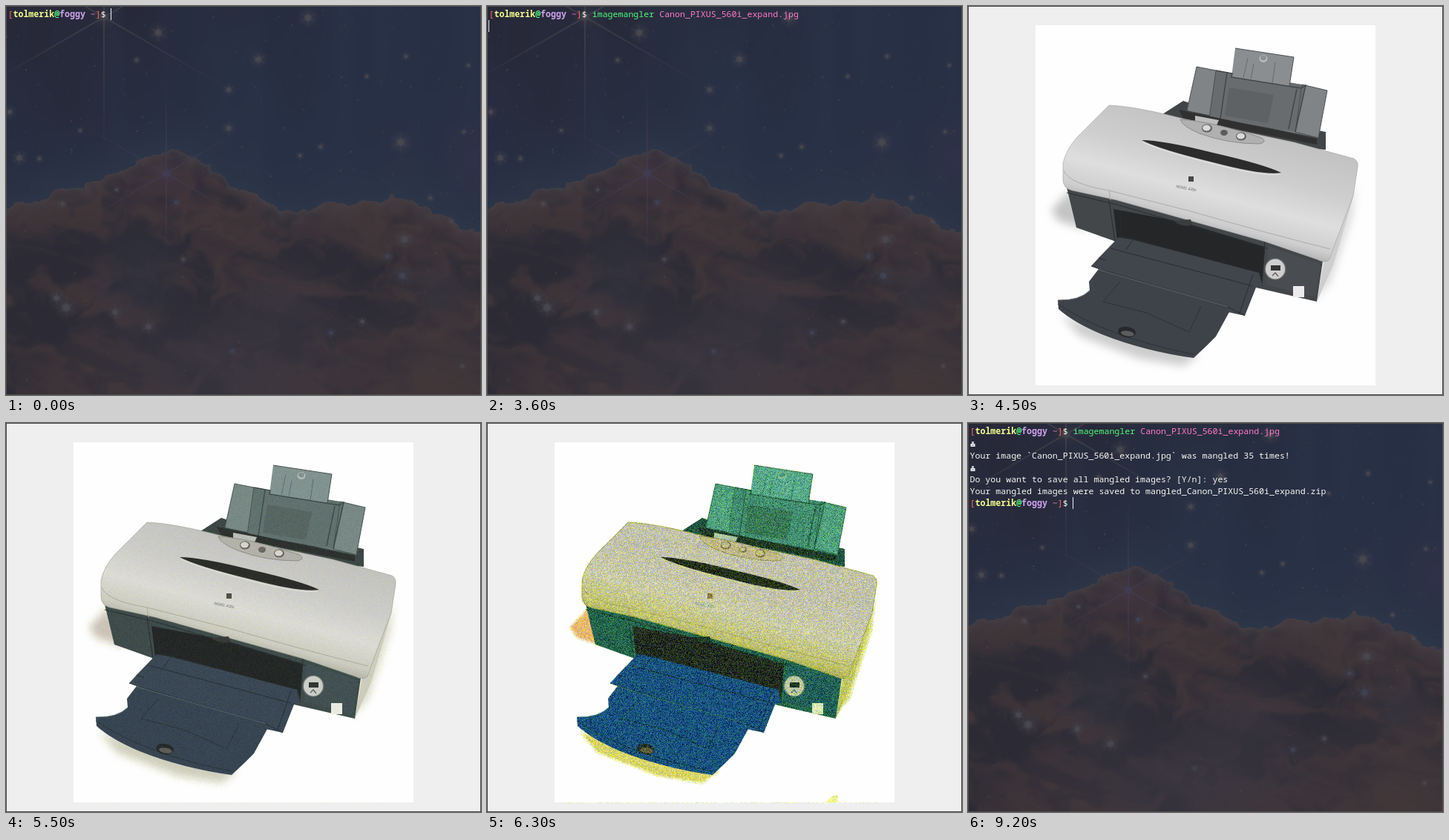
An HTML page with a canvas that plays this animation: 640 by 525 pixels, repeating every 10 s.

```html
<!DOCTYPE html>
<html lang="en">
<head>
<meta charset="utf-8">
<title>imagemangler in a terminal</title>
<style>
html, body { margin: 0; width: 100%; height: 100%; overflow: hidden; background: #282a36; }
#stage { position: relative; width: 640px; height: 525px; overflow: hidden; }
canvas { position: absolute; left: 0; top: 0; }
#frame { position: absolute; inset: 0; border: 1px solid #4b4b49; border-top-width: 1.5px; box-sizing: border-box; }
#term {
  position: absolute; left: 2.5px; top: 3.2px; margin: 0; color: #f8f8f2;
  font: 11.6px/16.2px "Noto Sans Mono", monospace; white-space: pre; font-variant-ligatures: none;
}
#term div { height: 16.2px; }
#term b { font-weight: 700; }
.red { color: #ff6a5c; }
.yellow { color: #f1fa8c; }
.green { color: #50fa7b; }
.violet { color: #cfa2ee; }
.pink { color: #ff79c6; }
.cursor { position: absolute; width: 1.4px; height: 16px; margin-left: -1px; background: #e4f2f4; }
.icon { display: block; padding-top: 5px; }
#more { position: absolute; left: 224px; top: 5px; font: 12px/16px "Noto Sans", sans-serif; color: #555; }
</style>
</head>
<body>
<div id="stage">
  <canvas id="view" width="640" height="525"></canvas>
  <div id="term"></div>
  <span id="more">»</span>
  <div id="frame"></div>
</div>
<script>
const W = 640, H = 525, LOOP = 10000;
const view = document.getElementById('view').getContext('2d', { willReadFrequently: true });
const term = document.getElementById('term');
const more = document.getElementById('more');

const clamp = v => Math.max(0, Math.min(1, v));
const rgb = c => typeof c === 'number' ? [c, c, c] : c;
const mix = (a, b, k) => { a = rgb(a); b = rgb(b); return a.map((v, i) => v + (b[i] - v) * k); };
const css = (c, a = 1) => `rgba(${rgb(c).map(Math.round)},${a})`;
const layer = () => Object.assign(document.createElement('canvas'), { width: W, height: H });

function random(seed) {
  return () => {
    seed = seed + 0x6D2B79F5 | 0;
    let h = Math.imul(seed ^ seed >>> 15, 1 | seed);
    h ^= h + Math.imul(h ^ h >>> 7, 61 | h);
    return ((h ^ h >>> 14) >>> 0) / 2 ** 32;
  };
}

// ---- wallpaper ----
function hash(x, y) {
  let h = Math.imul(x, 374761393) ^ Math.imul(y, 668265263);
  h = Math.imul(h ^ h >>> 13, 1274126177);
  return ((h ^ h >>> 16) >>> 0) / 2 ** 32;
}
function noise(x, y) {
  const i = Math.floor(x), j = Math.floor(y);
  let u = x - i, v = y - j;
  u *= u * (3 - 2 * u);
  v *= v * (3 - 2 * v);
  const a = hash(i, j), b = hash(i + 1, j), c = hash(i, j + 1), d = hash(i + 1, j + 1);
  return a + (b - a) * u + (c - a + (a - b - c + d) * u) * v;
}
function fbm(x, y, octaves) {
  let sum = 0, amp = .5;
  for (; octaves--; amp /= 2, x *= 2.03, y *= 2.03) sum += amp * noise(x, y);
  return sum;
}

const ridge = [[0, 271], [50, 256], [110, 241], [150, 224], [180, 207], [225, 195], [262, 213], [300, 238],
  [335, 252], [370, 279], [400, 274], [450, 264], [500, 262], [520, 255], [575, 276], [605, 292], [641, 311]];
function ridgeY(x) {
  const i = ridge.findIndex(p => p[0] > x), [a, b] = [ridge[i - 1], ridge[i]];
  return a[1] + (b[1] - a[1]) * (x - a[0]) / (b[0] - a[0]);
}
const blob = (x, y, cx, cy, rx, ry) => Math.exp(-(((x - cx) / rx) ** 2) - ((y - cy) / ry) ** 2);

function cloudColor(x, y, depth) {
  const warp = fbm(x / 45, y / 45, 3);
  const n = fbm(x / 60 + warp * 3, y / 32 + warp * 2.4, 5);
  let lit = clamp((n - .26) * 2.5);
  lit -= .5 * blob(x, y, 60, 335, 90, 45) + .55 * blob(x, y, 235, 410, 45, 40) + .6 * blob(x, y, 15, 485, 50, 40)
    + .45 * blob(x, y, 400, 320, 45, 40) + .4 * blob(x, y, 480, 385, 40, 40);
  let c = mix([66, 52, 52], [206, 124, 76], clamp(lit));
  c = mix(c, [104, 108, 128], .6 * blob(x, y, 180, 365, 50, 55) + .5 * blob(x, y, 580, 385, 30, 35));
  c = mix(c, [160, 134, 146], .65 * blob(x, y, 300, 490, 150, 75) + .35 * blob(x, y, 375, 400, 60, 50));
  c = mix(c, [212, 146, 92], .6 * blob(x, y, 600, 480, 110, 60));
  c = mix(c, [175, 70, 120], .4 * blob(x, y, 218, 240, 55, 30));
  return mix(c, [238, 188, 160], .75 * Math.exp(-depth / 9) + .15 * Math.exp(-depth / 40));
}
function skyColor(x, y, height) {
  const n = fbm(x / 80, y / 130, 3);
  let c = mix([34, 42, 84], [36, 84, 162], clamp(x / 520 + y / 420 + (n - .45) * 1.2));
  c = mix(c, [58, 118, 178], .3 * clamp(noise(x / 24, y / 400) * 2 - .9));
  c = mix(c, [98, 98, 176], .7 * blob(x, y, 630, 205, 40, 55) + .3 * blob(x, y, 530, 210, 25, 45));
  return mix(c, [86, 150, 192], .65 * Math.exp(-height / 34));
}

function star(g, x, y, size, tint = '255,240,225') {
  g.save();
  g.translate(x, y);
  const glow = g.createRadialGradient(0, 0, 0, 0, 0, Math.min(size, 18));
  glow.addColorStop(0, '#fff');
  glow.addColorStop(.22, `rgba(${tint},.9)`);
  glow.addColorStop(.4, `rgba(${tint},.25)`);
  glow.addColorStop(1, `rgba(${tint},0)`);
  g.fillStyle = glow;
  g.fillRect(-20, -20, 40, 40);
  for (let i = 0; i < 3; i++) {
    g.rotate(Math.PI / 3);
    const ray = g.createLinearGradient(0, -size, 0, size);
    ray.addColorStop(0, `rgba(${tint},0)`);
    ray.addColorStop(.5, `rgba(${tint},.85)`);
    ray.addColorStop(1, `rgba(${tint},0)`);
    g.fillStyle = ray;
    const w = size > 50 ? 2 : 1;
    g.fillRect(-w / 2, -size, w, size * 2);
  }
  g.restore();
}

function makeWallpaper() {
  const canvas = layer(), g = canvas.getContext('2d'), img = g.createImageData(W, H);
  for (let x = 0; x < W; x++) {
    const top = ridgeY(x);
    for (let y = 0; y < H; y++) {
      let d = y - top;
      if (Math.abs(d) < 60) d += (fbm(x / 18, y / 18, 4) - .47) * 22;
      const c = d > 0 ? cloudColor(x, y, d) : skyColor(x, y, -d);
      img.data.set([...c, 255], (y * W + x) * 4);
    }
  }
  g.putImageData(img, 0, 0);

  const rnd = random(11);
  for (let i = 0; i < 950; i++) {
    const x = rnd() * W, y = rnd() * H, r = .4 + .9 * rnd() ** 4;
    const warm = y > ridgeY(x);
    if (warm && rnd() < .45) continue;
    g.fillStyle = rnd() < .25 ? '#ffcfa0' : warm ? '#f4dcc0' : '#d6e8fa';
    g.globalAlpha = .45 + .5 * rnd();
    g.beginPath();
    g.arc(x, y, r, 0, 7);
    g.fill();
  }
  g.globalAlpha = 1;
  const bright = [[407, 16, 15], [340, 72, 13], [205, 36, 15], [300, 113, 10], [300, 165, 11], [532, 184, 17],
    [18, 205, 12], [45, 206, 7], [5, 143, 10], [537, 315, 15], [81, 407, 17], [68, 394, 13],
    [147, 413, 12], [192, 433, 13], [396, 202, 7], [486, 95, 6], [539, 68, 7], [623, 80, 6],
    [617, 170, 6], [572, 259, 7], [480, 426, 8], [176, 73, 7], [76, 267, 8], [149, 248, 6],
    [600, 291, 6], [424, 190, 7], [239, 342, 7], [100, 168, 6], [615, 486, 6]];
  bright.forEach(s => star(g, ...s));
  for (const s of [[534, 364, 15], [438, 441, 9], [305, 466, 8], [229, 265, 9], [514, 338, 9]]) star(g, ...s, '190,205,255');
  star(g, 132, 15, 190, '225,205,190');
  star(g, 216, 226, 125, '205,160,240');
  return canvas;
}

// ---- printer; every tone has a clean and a mangled value ----
function drawPrinter(g, k) {
  const tone = (a, b, alpha) => css(mix(a, b, k), alpha);
  const fill = (d, a, b, alpha) => { g.fillStyle = tone(a, b, alpha); g.fill(new Path2D(d)); };
  const line = (d, a, b, w = 1, alpha) => { g.strokeStyle = tone(a, b, alpha); g.lineWidth = w; g.stroke(new Path2D(d)); };
  const oval = (x, y, rx, ry, a, b, turn = 0) => {
    g.fillStyle = tone(a, b);
    g.beginPath();
    g.ellipse(x, y, rx, ry, turn, 0, 7);
    g.fill();
  };
  const navy = [28, 74, 136], teal = [40, 92, 86], sea = [84, 152, 136], ink = [34, 50, 46];

  g.fillStyle = '#efefef';
  g.fillRect(0, 0, W, H);
  g.fillStyle = '#fefefe';
  g.fillRect(91, 26, 458, 486);

  g.save();
  g.filter = `blur(${6 - 4.5 * k}px)`;
  fill('M138 248L112 276L122 290L160 302Z', 196, [232, 176, 130]);
  fill('M126 418L150 445L230 476L290 486L312 470Z', 205, [216, 206, 126]);
  fill('M468 396L488 372L518 280L522 240L480 340Z', 215, [214, 212, 140]);
  g.restore();
  if (k > .6) fill('M457 512Q468 498 473 504L472 512Z', 255, [240, 240, 170]);

  // paper support
  fill('M262 146L290 128L302 132L482 170L482 194L440 190Z', [66, 69, 71], [36, 76, 74]);
  fill('M308 82L334 87L352 90L450 106L484 114L472 178L295 141Z', [128, 132, 134], sea);
  fill('M334 87L455 107L441 170L325 151Z', [104, 108, 110], [70, 134, 122]);
  fill('M360 57L439 69L433 108L355 96Z', [138, 142, 144], [92, 160, 148]);
  fill('M352 110L412 120L404 158L346 148Z', [94, 98, 100], [60, 112, 96]);
  line('M308 82L334 87L325 151L295 141ZM450 106L484 114L472 178L441 170ZM360 57L439 69L433 108', [74, 78, 80], [48, 100, 78]);
  line('M334 87L356 91L355 96L449 111L455 107L441 170M349 90L340 152M443 112L432 166', [66, 69, 72], [40, 86, 74], 1.4);
  line('M377 70L371 97M414 76L410 104M385 78L381 98', [102, 106, 108], [60, 122, 110]);
  oval(398, 71, 5.5, 5, 190, [150, 190, 170]);
  oval(398, 70, 4, 3.5, [142, 146, 148], sea);
  fill('M284 140L470 179L470 187L290 152Z', 48, ink);
  fill('M306 148L338 154L334 163L306 157Z', 188, [170, 190, 180]);

  // lower case and side
  fill('M480 342L524 214L519 258L492 350L470 399Z', 206, [192, 190, 120]);
  fill('M133 245L200 260L400 316L478 344L470 399L388 380L205 320L146 299Z', [67, 71, 74], teal);
  fill('M196 274L290 292L400 325L396 378L330 352L201 315Z', [37, 38, 40], [38, 36, 42]);
  line('M190 262L198 318M205 283L206 310L396 362M400 318L396 378M133 252L200 268L400 326L477 350', [42, 45, 48], ink);
  fill('M404 324L475 348L468 393L402 376Z', [73, 77, 81], [38, 88, 98]);

  // trays
  fill('M203 312L220 315L392 360L397 377L388 380L373 418L350 413L166 351L176 340Z', [65, 69, 76], navy);
  fill('M176 355L352 404L352 413L334 446L321 459L304 475Q238 466 180 443Q142 427 122 409L121 397Q150 398 164 384L163 372Z',
    [62, 66, 73], navy);
  line('M166 351L180 356L352 407L373 418M192 327L384 378M176 340L186 343M384 362L366 414M222 316L212 330', [42, 45, 50], [26, 46, 66]);
  line('M205 372L182 399M314 405L298 440M182 399L240 414L298 440M121 402Q190 448 304 470', [47, 50, 56], [24, 54, 70]);
  line('M176 356L350 406M121 397Q150 398 164 384', [96, 100, 108], [54, 116, 120]);
  oval(214, 440, 12, 7, [38, 40, 44], [36, 44, 54], .15);
  oval(215, 442, 9, 3.5, [92, 92, 92], [100, 90, 70], .15);

  // cover
  const cover = 'M190 134Q224 135 290 152L440 184L520 206Q526 209 525 218L519 256L497 314L487 342Q482 348 470 342'
    + 'L400 318L300 290L200 262L140 249Q128 246 128 234L128 212Q132 194 147 177Z';
  const shade = g.createLinearGradient(335, 145, 292, 305);
  [[0, 192, [192, 187, 192]], [.4, 206, [194, 188, 193]], [.65, 222, [202, 197, 188]], [.86, 206, [192, 188, 136]], [1, 162, [154, 154, 92]]]
    .forEach(([at, a, b]) => shade.addColorStop(at, tone(a, b)));
  g.fillStyle = shade;
  g.fill(new Path2D(cover));
  line(cover, 150, [158, 160, 74], 1, .5 + .4 * k);
  line('M129 222Q136 240 190 249L192 262M190 249L300 277Q400 306 488 328', 172, [168, 162, 100]);
  fill('M277 290Q290 300 302 295L300 288Z', 60, ink);

  fill('M286 153Q330 156 396 178Q404 184 392 186Q350 186 312 172Q288 162 286 153Z', 176, [192, 178, 156]);
  line('M286 153Q330 156 396 178Q404 184 392 186Q350 186 312 172Q288 162 286 153Z', 140, [150, 140, 110]);
  for (const [x, y, r] of [[322, 165, 7], [345, 171, 5], [368, 176, 7]]) {
    oval(x, y, r, r * .8, 96, [130, 120, 80]);
    oval(x - .5, y - .5, r - 1.6, r * .8 - 1.6, r > 6 ? 218 : 92, [196, 186, 160]);
  }
  fill('M234 181Q262 181 330 198Q400 214 422 225Q398 229 330 211Q256 193 234 181Z', 44, [42, 42, 36]);
  line('M236 184Q262 196 330 213Q398 231 420 227', 232, [212, 212, 150]);

  // badges
  g.fillStyle = tone(70, [136, 112, 70]);
  g.fillRect(297, 230, 7, 7);
  g.save();
  g.translate(280, 245);
  g.rotate(.19);
  g.font = 'italic 5.2px "Open Sans", sans-serif';
  g.fillStyle = tone(92, [90, 140, 140]);
  g.fillText('NOVEL 430x', 0, 0);
  g.restore();
  oval(414, 355, 14.5, 14.5, 112, [96, 120, 110]);
  oval(414, 355, 13, 13.5, 206, [190, 194, 180]);
  g.fillStyle = tone(52, ink);
  g.fillRect(408, 350, 13, 7);
  line('M410 364L414 360L418 365', 96, [80, 120, 110], 1.4);
  g.fillStyle = tone(236, [216, 224, 200]);
  g.fillRect(438, 378, 15, 15);
}

// Colour grain that grows with each save.
function mangle(g, step, k) {
  const img = g.getImageData(106, 56, 423, 457), p = img.data, rnd = random(step * 977);
  for (let i = 0; i < p.length; i += 4) {
    const u = rnd(), luma = (rnd() - .5) * 52 * k;
    const sum = p[i] + p[i + 1] + p[i + 2];
    if (sum > 750) continue;
    let shift = [0, 0, 0];
    if (sum > 450) shift = u < .3 ? [14, 20, -80] : u < .37 ? [-50, 14, 8] : shift;
    else shift = u < .28 ? [4, 34, -36] : u < .38 ? [-20, 24, 26] : u < .5 ? [-28, -34, -34] : shift;
    for (let c = 0; c < 3; c++) p[i + c] += shift[c] * k + luma;
  }
  g.putImageData(img, 106, 56);
}

// ---- terminal ----
const span = (cls, text, tag = 'span') => `<${tag} class="${cls}">${text}</${tag}>`;
const cursor = '<i class="cursor"></i>';
const icon = '<svg class="icon" width="9" height="10" viewBox="0 0 9 10">'
  + '<path d="M2 1h3v3H2z" fill="#b9bcc4"/><path d="M.5 4h6v4h-6z" fill="#eceef0"/><path d="M2 5.5h3v1H2z" fill="#77798a"/></svg>';
const prompt = span('red', '[') + span('yellow', 'tolmerik', 'b') + span('green', '@', 'b') + span('violet', 'foggy', 'b')
  + ' ' + span('pink', '~') + span('red', ']') + '$ ';
const command = 'imagemangler', file = 'Canon_PIXUS_560i_expand';

function typedCommand(t) {
  if (t < 1000) return '';
  if (t < 2000) {
    const count = t < 1200 ? 1 : Math.min(7, 2 + Math.floor((t - 1200) / 100));
    return span('red', command.slice(0, count));
  }
  const arg = t < 3000 ? '' : t < 3200 ? 'C' : span('pink', file + '.jpg') + ' ';
  return span('green', command) + ' ' + arg;
}
function screen(t) {
  const rows = [prompt + typedCommand(t)];
  if (t >= 3600 && t < 7400) rows.push('');
  if (t >= 7400) {
    const answer = 'yes'.slice(0, t < 8100 ? 0 : t < 8200 ? 1 : t < 8400 ? 2 : 3);
    rows.push(icon, `Your image \`${file}.jpg\` was mangled 35 times!`, icon,
      'Do you want to save all mangled images? [Y/n]: ' + answer);
    if (t >= 9100) rows.push(`Your mangled images were saved to mangled_${file}.zip`);
    if (t >= 8600) rows.push(t >= 9200 ? prompt : '');
  }
  rows[rows.length - 1] += cursor;
  return rows.map(r => `<div>${r}</div>`).join('');
}

// ---- playback ----
const wallpaper = makeWallpaper();
let shownScene, shownText;

function drawScene(scene) {
  if (scene >= 0) {
    const k = (scene / 22) ** 4;
    drawPrinter(view, k);
    mangle(view, scene, k);
    return;
  }
  view.drawImage(wallpaper, 0, 0);
  if (scene === -2) {
    view.fillStyle = 'rgba(40,42,54,.85)';
    view.fillRect(0, 0, W, H);
  } else {
    view.fillStyle = '#efefef';
    view.fillRect(1, 1, 232, 175);
    view.fillStyle = '#000';
    view.fillRect(1, 62, 232, 66);
  }
}

function play() {
  const t = performance.now() % LOOP;
  const inShell = t < 4000 || t >= 7400;
  const scene = inShell ? -2 : Math.min(22, Math.floor((t - 4100) / 100));
  if (scene !== shownScene) {
    drawScene(shownScene = scene);
    more.style.display = scene === -1 ? '' : 'none';
  }
  const text = inShell ? screen(t) : '';
  if (text !== shownText) term.innerHTML = shownText = text;
  requestAnimationFrame(play);
}
play();
</script>
</body>
</html>
```
